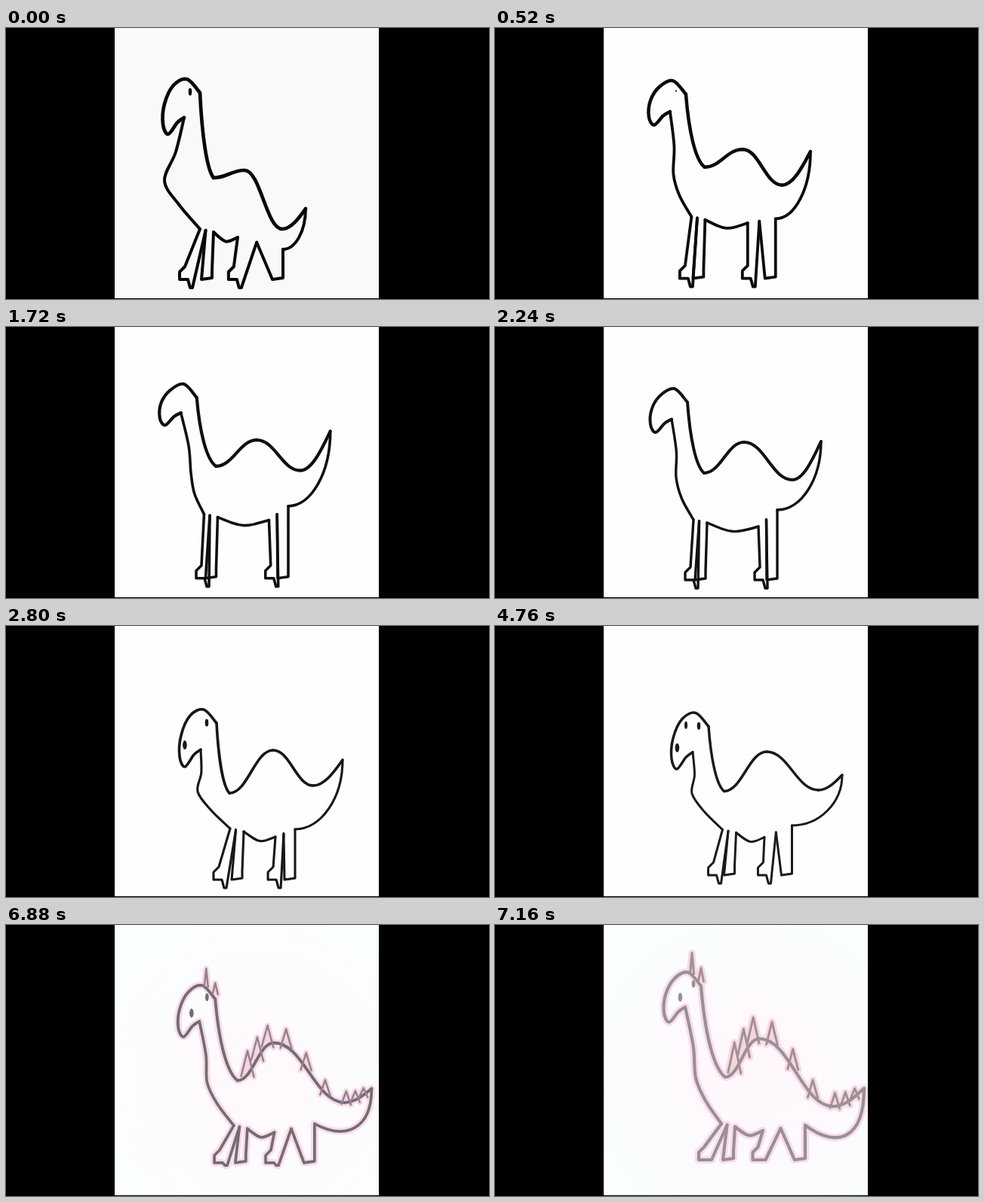
Recreate the animation shown at these times as an HTML page with a canvas. Size 640x360 px, loop 7240 ms.

```html
<!DOCTYPE html>
<html lang="en">
<head>
<meta charset="utf-8">
<title>Dinosaur sketch</title>
<style>
html, body { margin: 0; width: 100%; height: 100%; overflow: hidden; background: #000; }
canvas { display: block; width: 100vw; height: 100vh; }
</style>
</head>
<body>
<canvas id="stage" width="640" height="360"></canvas>
<script>
const ctx = document.getElementById('stage').getContext('2d');
const LOOP = 7240;

// Key joints of the dinosaur; everything else is built from them.
const poses = [
  { crown: [240, 68], dip: [275, 199], peak: [316, 189], low: [366, 267], tip: [397, 240], rump: [367, 294],
    chest: [210, 203], hip: [257, 267], rear: [307, 278], size: [73], ground: [334], stride: [27] },
  { crown: [234, 71], dip: [279, 178], peak: [334, 148], low: [387, 181], tip: [428, 128], rump: [374, 234],
    chest: [249, 190], hip: [262, 243], rear: [348, 250], size: [52], ground: [332], stride: [10] },
  { crown: [238, 82], dip: [277, 194], peak: [330, 153], low: [394, 203], tip: [432, 152], rump: [374, 243],
    chest: [240, 200], hip: [263, 256], rear: [349, 265], size: [58], ground: [336], stride: [11] },
  { crown: [262, 111], dip: [296, 222], peak: [354, 165], low: [407, 212], tip: [446, 178], rump: [383, 270],
    chest: [254, 220], hip: [297, 269], rear: [357, 280], size: [76], ground: [337], stride: [22] },
  { crown: [270, 120], dip: [311, 217], peak: [366, 169], low: [450, 224], tip: [474, 218], rump: [404, 260],
    chest: [268, 225], hip: [306, 272], rear: [357, 281], size: [73], ground: [325], stride: [16] },
  { crown: [256, 63], dip: [305, 202], peak: [350, 151], low: [448, 241], tip: [489, 217], rump: [411, 266],
    chest: [266, 203], hip: [300, 264], rear: [355, 273], size: [66], ground: [312], stride: [30] }
];

// The drawing is redrawn only at these times (ms) and held in between.
const cuts = [0, 80, 480, 520, 720, 760, 1320, 1680, 1720, 1960, 2000, 2240, 2360, 2520,
  2800, 4760, 4800, 4840, 6240, 6280, 6640, 6680, 6880, 6920, 7120, 7160];
// Time and pose number; linear between.
const path = [[0, 0], [80, .5], [1320, 1], [2240, 2], [2800, 3], [4760, 3.5], [4840, 3.75], [6240, 4], [7160, 5]];

const lerp = (a, b, f) => a + (b - a) * f;
const mix = (a, b, f) => a.map((v, i) => lerp(v, b[i], f));
const add = (p, x, y) => [p[0] + x, p[1] + y];
const clamp = v => Math.max(0, Math.min(1, v));

function poseAt(t) {
  const time = cuts.findLast(c => c <= t);
  const i = Math.max(1, path.findIndex(p => p[0] >= time));
  const [[t0, p0], [t1, p1]] = [path[i - 1], path[i]];
  return lerp(p0, p1, (time - t0) / (t1 - t0));
}

function blend(p) {
  const i = Math.min(poses.length - 2, Math.floor(p));
  const joints = {};
  for (const key in poses[i]) joints[key] = mix(poses[i][key], poses[i + 1][key], p - i);
  return joints;
}

// Cubic between two points that leaves and arrives level.
function level(a, b) {
  const reach = (b[0] - a[0]) * .42;
  return [a, add(a, reach, 0), add(b, -reach, 0), b];
}

function onCubic([a, b, c, d], t) {
  const ab = mix(a, b, t), bc = mix(b, c, t), cd = mix(c, d, t);
  return mix(mix(ab, bc, t), mix(bc, cd, t), t);
}

function cubic([a, b, c, d]) {
  const line = new Path2D();
  line.moveTo(...a);
  line.bezierCurveTo(...b, ...c, ...d);
  return line;
}

function poly(points) {
  const line = new Path2D();
  points.forEach(p => line.lineTo(...p));
  return line;
}

function spline(points) {
  const line = new Path2D();
  line.moveTo(...points[0]);
  for (let i = 0; i < points.length - 1; i++) {
    const b = points[i], c = points[i + 1];
    const a = points[i - 1] || b, d = points[i + 2] || c;
    line.bezierCurveTo(...add(b, (c[0] - a[0]) / 6, (c[1] - a[1]) / 6),
      ...add(c, (b[0] - d[0]) / 6, (b[1] - d[1]) / 6), ...c);
  }
  return line;
}

function headPoints({ crown, size: [h] }) {
  return [[-4, h * .7], [-13, h * .79], [-25, h], [-32, h * .82], [-30, h * .45],
    [-18, 8], [0, 0], [17, 18]].map(([x, y]) => add(crown, x, y));
}

// A near leg with a clawed foot and a far leg behind it.
function legPair(left, right, foot, farFoot, ground, claw) {
  const inner = mix(left, right, .42);
  return [
    poly([left, [foot + 7, ground - 17], [foot, ground - 10], [foot, ground],
      [foot + 11, ground], [foot + 14, ground + claw], [foot + 17, ground + claw], inner]),
    poly([inner, [farFoot - 14, ground], [farFoot, ground - 2], [farFoot, ground - 12], right])
  ];
}

function plate(base, width, height) {
  return poly([add(base, -width / 2, 2), add(base, 0, -height), add(base, width / 2, 3)]);
}

function plates(j, curves, grow) {
  const list = [plate(add(j.crown, 5, -1), 5, lerp(13, 25, grow)),
    plate(add(j.crown, 17, 9), 7, lerp(6, 15, grow))];
  const count = 9;
  for (let i = 0; i < count; i++) {
    const u = .25 + i * .3;
    const base = onCubic(curves[Math.floor(u)], u % 1);
    const f = i / (count - 1);
    list.push(plate(base, lerp(17, 11, f), lerp(38, 11, f) * lerp(.45, 1, grow)));
  }
  return list;
}

function spot([x, y], rx, ry, color) {
  ctx.fillStyle = color;
  ctx.beginPath();
  ctx.ellipse(x, y, rx, ry, 0, 0, Math.PI * 2);
  ctx.fill();
}

function stroke(line, width, color) {
  ctx.lineWidth = width;
  ctx.strokeStyle = color;
  ctx.stroke(line);
}

function paper(p, pink) {
  ctx.fillStyle = '#000';
  ctx.fillRect(0, 0, 640, 360);
  const shade = ctx.createRadialGradient(340, 200, 60, 340, 200, 220);
  shade.addColorStop(0, `rgb(254,${254 - 6 * pink},${253 - pink})`);
  shade.addColorStop(1, `rgb(${254 - 4 * pink},254,${253 + pink})`);
  ctx.fillStyle = p === 0 ? '#f9f9f9' : shade;
  ctx.fillRect(144, 0, 350, 359);
}

function face(j, p, pink, ink) {
  const h = j.size[0];
  const open = clamp(Math.abs(p - 1.5) - .5);
  const eyeY = h * .23;
  if (open) spot(add(j.crown, 4 + 3 * pink, eyeY), 2.3 * open, 5 * open, ink);
  if (p >= 3.5 && p < 4.5) spot(add(j.crown, -13, eyeY - 1), 2, 5, ink);
  if (p > 2.5) spot(add(j.crown, h * lerp(-.33, -.16, pink), h * lerp(.62, .5, pink)), 2.8, 6, ink);
}

function draw(p) {
  const j = blend(p);
  const pink = clamp(p - 4);
  const width = lerp(4.7, 3.3, p / 4) + 1.2 * pink;
  const thin = lerp(width * .85, width, pink);
  const tone = lerp(8 + p * 5, 152, pink);
  const ink = `rgb(${tone},${tone - 8 * pink},${tone - 4 * pink})`;
  paper(p, pink);

  const head = headPoints(j);
  const [mouth, nape] = [head[0], head.at(-1)];
  const [nx, ny] = [j.dip[0] - nape[0], j.dip[1] - nape[1]];
  const neck = [nape, add(nape, nx * .15, ny * .5), add(j.dip, -nx * .5, -ny * .1), j.dip];
  const rise = level(j.dip, j.peak);
  const fall = level(j.peak, j.low);
  const [tx, ty] = [j.tip[0] - j.low[0], j.tip[1] - j.low[1]];
  const tail = [j.low, add(j.low, tx * .4, 0), add(j.tip, -tx * .25, -ty * .4), j.tip];
  const under = [j.tip, add(j.tip, 0, (j.rump[1] - j.tip[1]) * .55 + 40 * pink),
    add(j.rump, (j.tip[0] - j.rump[0]) * .55, 32 * pink), j.rump];
  const throat = spline([mouth, add(mix(mouth, j.chest, .55), 3, 0), j.chest,
    add(mix(j.chest, j.hip, .5), -4, 0), j.hip]);
  const flank = add(j.hip, 18, 4);
  const sag = add(mix(flank, j.rear, .5), 0, 12);
  const [ground, stride] = [j.ground[0], j.stride[0]];
  const claw = 11 * (1 - pink);

  const bold = [spline(head), ...[neck, rise, fall, tail].map(cubic)];
  const fine = [cubic(under), throat, cubic([flank, sag, sag, j.rear]),
    ...legPair(j.hip, flank, j.hip[0] - stride, j.hip[0] + 16, ground, claw),
    ...legPair(j.rear, j.rump, j.rear[0] - stride * .45, j.rump[0], ground, claw)];
  const spikes = p < 4 ? [] : plates(j, [rise, fall, tail], pink);

  if (pink) {
    for (const line of [...bold, ...fine]) stroke(line, thin + 6, `rgba(250,220,238,${clamp(pink * 2)})`);
  }
  for (const line of spikes) {
    stroke(line, 5 + 4 * pink, '#fad9e2');
    ctx.fillStyle = '#f6d5dc';
    ctx.fill(line);
  }
  for (const line of bold) stroke(line, width, ink);
  for (const line of fine) stroke(line, thin, ink);
  for (const line of spikes) stroke(line, lerp(1.4, 3, pink), `rgb(${lerp(120, 160, pink)},${lerp(95, 146, pink)},150)`);
  face(j, p, pink, ink);
}

ctx.lineCap = ctx.lineJoin = 'round';
const start = performance.now();

function frame() {
  draw(poseAt((performance.now() - start) % LOOP));
  requestAnimationFrame(frame);
}
frame();
</script>
</body>
</html>
```
